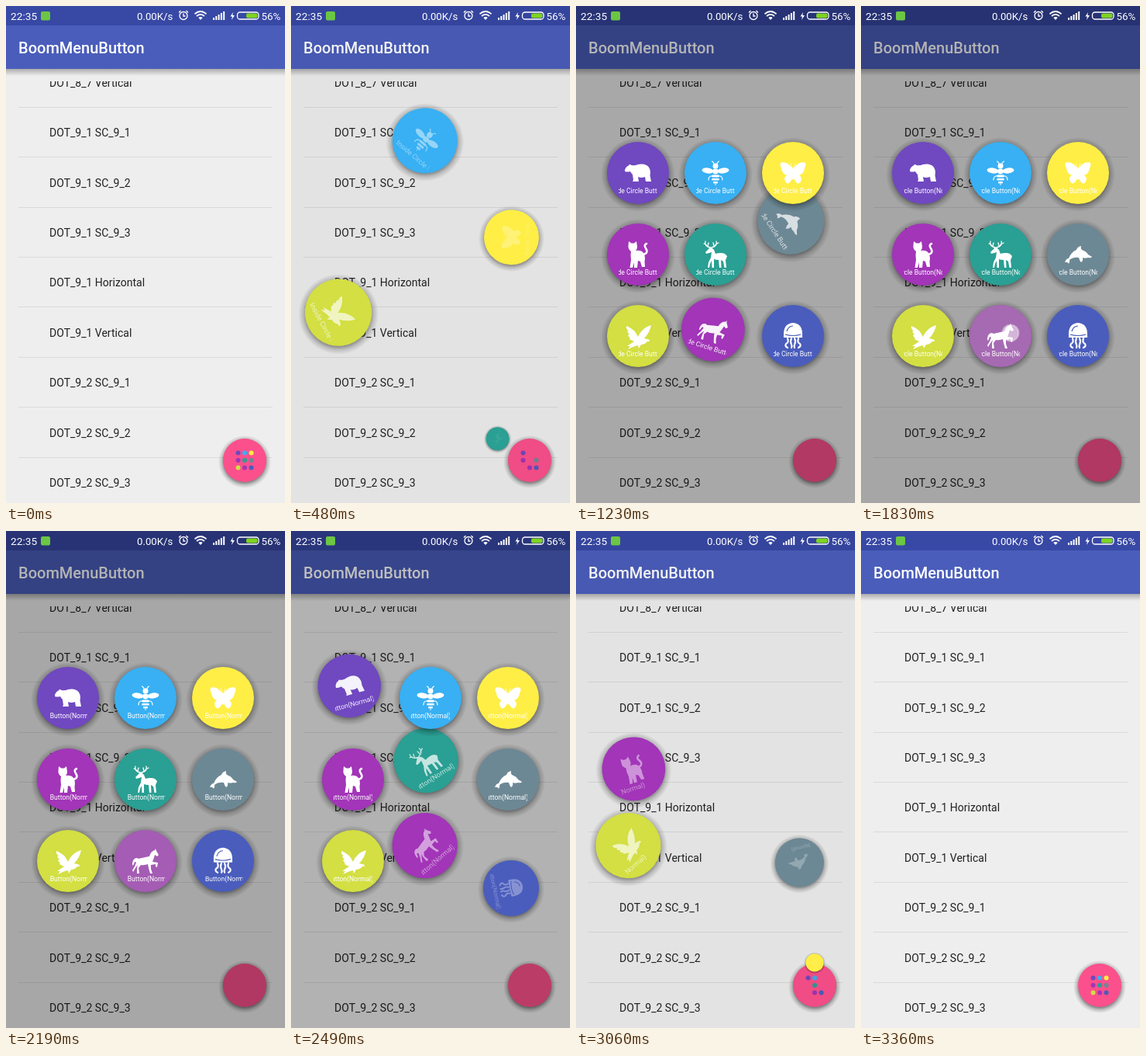
An HTML page for the animation above (3450 ms loop, 360x640 px).

```html
<!DOCTYPE html>
<html lang="en">
<head>
<meta charset="utf-8">
<title>Boom menu</title>
<style>
html, body { margin: 0; width: 100%; height: 100%; overflow: hidden; background: #eee; }
svg { display: block; width: 360px; height: 640px; font-family: Roboto, "Noto Sans", sans-serif; }
</style>
</head>
<body>
<svg id="stage" viewBox="0 0 360 640">
  <defs>
    <radialGradient id="shade">
      <stop offset=".78" stop-color="#000" stop-opacity=".42"/>
      <stop offset=".88" stop-color="#000" stop-opacity=".17"/>
      <stop offset="1" stop-color="#000" stop-opacity="0"/>
    </radialGradient>
    <linearGradient id="drop" x2="0" y2="1">
      <stop stop-color="#000" stop-opacity=".28"/>
      <stop offset="1" stop-color="#000" stop-opacity="0"/>
    </linearGradient>
    <clipPath id="listBox"><rect y="97" width="360" height="543"/></clipPath>
    <clipPath id="labelBox"><rect x="-25" y="14" width="50" height="18"/></clipPath>
  </defs>

  <rect width="360" height="640" fill="#eee"/>
  <g id="list" clip-path="url(#listBox)" font-size="14" fill="#212121"></g>
  <rect y="81" width="360" height="9" fill="url(#drop)"/>
  <rect width="360" height="25" fill="#3848a5"/>
  <rect y="25" width="360" height="56" fill="#4a5dbb"/>
  <text x="16" y="61" font-size="20" font-weight="500" fill="#fff">BoomMenuButton</text>

  <circle cx="308" cy="587" r="34" fill="url(#shade)"/>
  <circle cx="308" cy="585" r="28" fill="#fc508c"/>
  <g id="dots"></g>
  <rect id="dim" width="360" height="640"/>

  <g id="status" fill="#fff" font-size="13.4">
    <text x="6" y="17.5" font-size="13.7">22:35</text>
    <rect x="45" y="7" width="12" height="11.5" rx="2" fill="#6cc644"/>
    <text x="169" y="17.5" font-size="13.2">0.00K/s</text>
    <g fill="none" stroke="#fff" stroke-width="1.3">
      <circle cx="229" cy="12.5" r="5"/>
      <path d="M229 9.5V13H231.5M223 8.5L225.5 6M235 8.5L232.500 6"/>
      <path d="M243.500 10.200Q251 3.800 258.500 10.200M246 13Q251 8.800 256 13" stroke-width="1.8"/>
      <rect x="298.500" y="8" width="27.500" height="9" rx="3.500"/>
    </g>
    <path d="M248.300 15Q251 12.800 253.700 15L251 18Z"/>
    <path d="M267 15h2v3h-2zM270.300 13h2v5h-2zM273.600 11h2v7h-2zM276.900 9h2v9h-2zM280.200 7h2v11h-2z"/>
    <path d="M293 8L289.500 13.500H292L291 18L295 12H292.300Z"/>
    <rect x="310" y="9.500" width="14.500" height="6" rx="2" fill="#7ed321"/>
    <text x="329.500" y="17.500">56%</text>
  </g>
  <g id="buttons"></g>
</svg>
<script>
const LOOP = 3450, SHOW = 180, HIDE = 2190, RUN = 450, GAP = 90;
const TOTAL = RUN + 8 * GAP;
const LABEL = "Inside Circle Button(Normal)";
const $ = id => document.getElementById(id);
const clamp = v => Math.max(0, Math.min(1, v));

function add(parent, tag, attrs, text) {
  const el = document.createElementNS("http://www.w3.org/2000/svg", tag);
  for (const key in attrs) el.setAttribute(key, attrs[key]);
  if (text) el.textContent = text;
  parent.appendChild(el);
  return el;
}

const line = (d, w) => `<path d="${d}" fill="none" stroke="#fff" stroke-width="${w}" stroke-linecap="round" stroke-linejoin="round"/>`;
const fill = d => `<path d="${d}"/>`;
const mirror = s => s + `<g transform="scale(-1 1)">${s}</g>`;

const icons = {
  bear: fill("M-17-4Q-15-9-12-9.500Q-11-12-8.500-10Q-4-9 0-11Q9-13 13.500-8Q17-3 15.500 3L17 11H10L9 5Q4 7 0 5L1 11H-7L-6 9L-7 2Q-9 0-10-2Q-14-1-17-2Z"),
  bee: mirror('<ellipse cx="10" cy="-3" rx="7.500" ry="3.600" transform="rotate(-8 10 -3)"/>' +
      line("M1.500-10Q2-14 4.500-15", 1.2) + line("M5 4Q9 4 9 9", 1.2)) +
    '<circle cy="-9" r="3.500"/><ellipse cy="-2" rx="3.800" ry="3.400"/>' +
    line("M-3.500 4H3.500", 2.800) + line("M-3.500 8.300H3.500", 2.600) + line("M-1.800 12.300H1.800", 2.400) + line("M0 14V15.500", 1),
  butterfly: mirror(fill("M0-4Q6-15 15-13.500Q18-12 15-6Q14 1 8 3Q13 6 9.500 12Q6 16 2 9L0 4Z") + line("M.5-4L3-12", .8)) +
    '<ellipse cy="1" rx="1.600" ry="8"/>',
  cat: fill("M-12-17L-8.500-14.500H-5L-2-17L-1-10Q-1-7-3-5Q4-6 7-2Q10 3 8.500 9L9 16H5L3 9L0 8L-1 17H-5L-5 10L-7 17H-10.500L-9 7Q-10 1-9-4Q-13-7-12.500-11Z") +
    line("M7 0Q14-2 10-8Q7-12 11-14", 2.600),
  deer: fill("M-13-3L-8-8L-9-10L-5-9L-2-6L0-1Q7-3 12-1L15 2L14 5L13 7L14 17H11.500L10 9L7 7L7.500 17H5L4 7Q0 7-2 6L-2 17H-4.500L-5 8L-7 12L-8 17H-10L-9 10L-6 4L-5-3L-8-2L-12-1Z") +
    line("M-7-9Q-15-11-13-17M-12-13L-15-14M-5-9Q3-11 1-17M0-13L4-15M-10-11L-9-15M-2-11L-3-15", 1.300),
  dolphin: fill("M-17 10Q-15 5-12 5Q-9-3-2-6Q-1-10 4-11Q3-8 5-6Q11-4 13 0L18 3Q17 5 13 4Q9 5 6 4Q7 8 4 10Q2 8 1 4Q-6 3-11 7Q-10 9-12 12Q-13 9-17 10Z"),
  eagle: fill("M-15-13Q-4-9 0 1Q5-11 17-14Q15-4 8 3L12 4Q15 4 15 7L12 7Q9 11 4 11L1 16L0 12L-4 13L-13 17L-10 13L-14 13L-5 7Q-14 3-10 3Q-15-2-11-2Q-16-7-12-6Q-16-10-15-13Z"),
  horse: fill("M-9-3Q0-5 5-6Q7-13 12-14L13-16L14-13L17-8L15-6L12-8Q11-4 9 1L16 2L15 8L13 7L13 4L7 5L7 10L9 16H6L4 9L3 4Q-3 6-6 5L-9 9L-8 16H-11L-11 9L-10 5L-13 9L-16 14L-17 12L-14 7L-12 2Q-14-1-15 4Q-17 8-17 3Q-16-4-11-4Z"),
  jelly: fill("M-12 0Q-13-16 0-17Q13-16 12 0Q13 2 10 2H-10Q-13 2-12 0Z") +
    '<path d="M-10-2Q0 1 10-2M-8-6Q-6-13 0-13" fill="none" stroke="#4a5dbd" stroke-width="1.200"/>' +
    mirror(line("M2 3Q4 7 2 11Q1 13 2 15", 2.200) + line("M7 3Q5 8 9 10Q11 13 7 15", 2.200))
};
const colors = ["#7048c0", "#38b0f3", "#ffee45", "#a235b8", "#2a9f93", "#6d8895", "#d3df42", "#a235b8", "#4a5dbd"];
const showOrder = [6, 1, 2, 4, 0, 3, 8, 7, 5];
const hideOrder = [8, 7, 4, 0, 1, 2, 5, 3, 6];

const rows = ["8_7 Vertical", "9_1 SC_9_1", "9_1 SC_9_2", "9_1 SC_9_3", "9_1 Horizontal", "9_1 Vertical", "9_2 SC_9_1", "9_2 SC_9_2", "9_2 SC_9_3"];
rows.forEach((row, i) => {
  const y = 64.45 * i;
  add($("list"), "text", { x: 56, y: 103.6 + y }, "DOT_" + row);
  add($("list"), "rect", { x: 16, y: Math.round(129.6 + y), width: 328, height: 1, fill: "#dadada" });
});

// The first button lies on top of the later ones.
const items = Object.keys(icons).map((name, i) => {
  const col = i % 3, row = Math.floor(i / 3);
  return {
    name, color: colors[i],
    x0: 299.5 + 8.5 * col, y0: 575.5 + 9.5 * row,
    x1: 80 + 100 * col, y1: 215 + 105 * row,
    start: SHOW + GAP * showOrder.indexOf(i),
    back: HIDE + GAP * hideOrder.indexOf(i)
  };
});
items.slice().reverse().forEach(b => {
  b.dot = add($("dots"), "circle", { cx: b.x0, cy: b.y0, r: 3, fill: b.color });
  b.el = add($("buttons"), "g");
  b.shadow = add(b.el, "circle", { r: 48, fill: "url(#shade)" });
  b.spin = add(b.el, "g");
  add(b.spin, "circle", { r: 40, fill: b.color });
  b.press = add(b.spin, "circle", { r: 40, fill: "#aaa", opacity: 0 });
  b.face = add(b.spin, "g", { fill: "#fff" });
  add(b.face, "g").innerHTML = icons[b.name];
  const box = add(b.face, "g", { "clip-path": "url(#labelBox)" });
  b.label = add(box, "text", { y: 26, "font-size": 8.6 }, LABEL);
});
const touch = add($("buttons"), "circle", { cx: 193, cy: 421, r: 10.5, fill: "#fff", "fill-opacity": .5, stroke: "#fff", "stroke-opacity": .3, "stroke-width": 2 });

function bezier(x1, y1, x2, y2) {
  const at = (u, a, b) => 3 * (1 - u) * (1 - u) * u * a + 3 * (1 - u) * u * u * b + u * u * u;
  return x => {
    let lo = 0, hi = 1;
    for (let i = 0; i < 24; i++) {
      const mid = (lo + hi) / 2;
      if (at(mid, x1, x2) < x) lo = mid; else hi = mid;
    }
    return at(lo, y1, y2);
  };
}

// Smooth curve through a few points.
function spline(pts) {
  const slope = i => {
    const a = pts[Math.max(0, i - 1)], b = pts[Math.min(pts.length - 1, i + 1)];
    return (b[1] - a[1]) / (b[0] - a[0]);
  };
  return x => {
    let i = 0;
    while (i < pts.length - 2 && x > pts[i + 1][0]) i++;
    const [xa, ya] = pts[i], [xb, yb] = pts[i + 1];
    const h = xb - xa, u = (x - xa) / h, v = 1 - u;
    return ya * v * v * (1 + 2 * u) + yb * u * u * (1 + 2 * v) + h * u * v * (slope(i) * v - slope(i + 1) * u);
  };
}

const easeOut = bezier(.175, .885, .32, 1.275);
const easeIn = spline([[0, 0], [.067, -.021], [.267, -.045], [.467, -.058], [.667, .106], [.867, .543], [1, 1]]);
const smooth = x => (1 - Math.cos(Math.PI * clamp(x))) / 2;

function draw(t) {
  $("dim").setAttribute("opacity", .3 * (smooth((t - SHOW) / TOTAL) - smooth((t - HIDE) / TOTAL)));
  const scroll = Math.max(0, (t - 775) / 30);
  const pressed = clamp((t - 1770) / 60) * clamp((2280 - t) / 120);

  for (const b of items) {
    const open = clamp((t - b.start) / RUN), close = clamp((t - b.back) / RUN);
    const flying = open > 0 && close < 1;
    b.dot.style.display = flying ? "none" : "";
    b.el.style.display = flying ? "" : "none";
    if (!flying) continue;
    const f = close > 0 ? 1 - easeIn(close) : open < 1 ? easeOut(open) : 1;
    const angle = 720 * (close > 0 ? 1 - f : f);
    const x = b.x0 + (b.x1 - b.x0) * f, y = b.y0 + (b.y1 - b.y0) * f * f;
    const scale = .075 + .925 * f;
    b.el.setAttribute("transform", `translate(${x} ${y}) scale(${scale})`);
    b.shadow.setAttribute("cy", 2);
    b.spin.setAttribute("transform", `rotate(${angle})`);
    b.face.setAttribute("opacity", open * (1 - close));
    b.label.setAttribute("x", -25 - scroll);
    b.press.setAttribute("opacity", b.name === "horse" ? .45 * pressed : 0);
  }
  touch.style.display = t >= 1800 && t < 2130 ? "" : "none";
}

function tick() {
  draw(performance.now() % LOOP);
  requestAnimationFrame(tick);
}
tick();
</script>
</body>
</html>
```
